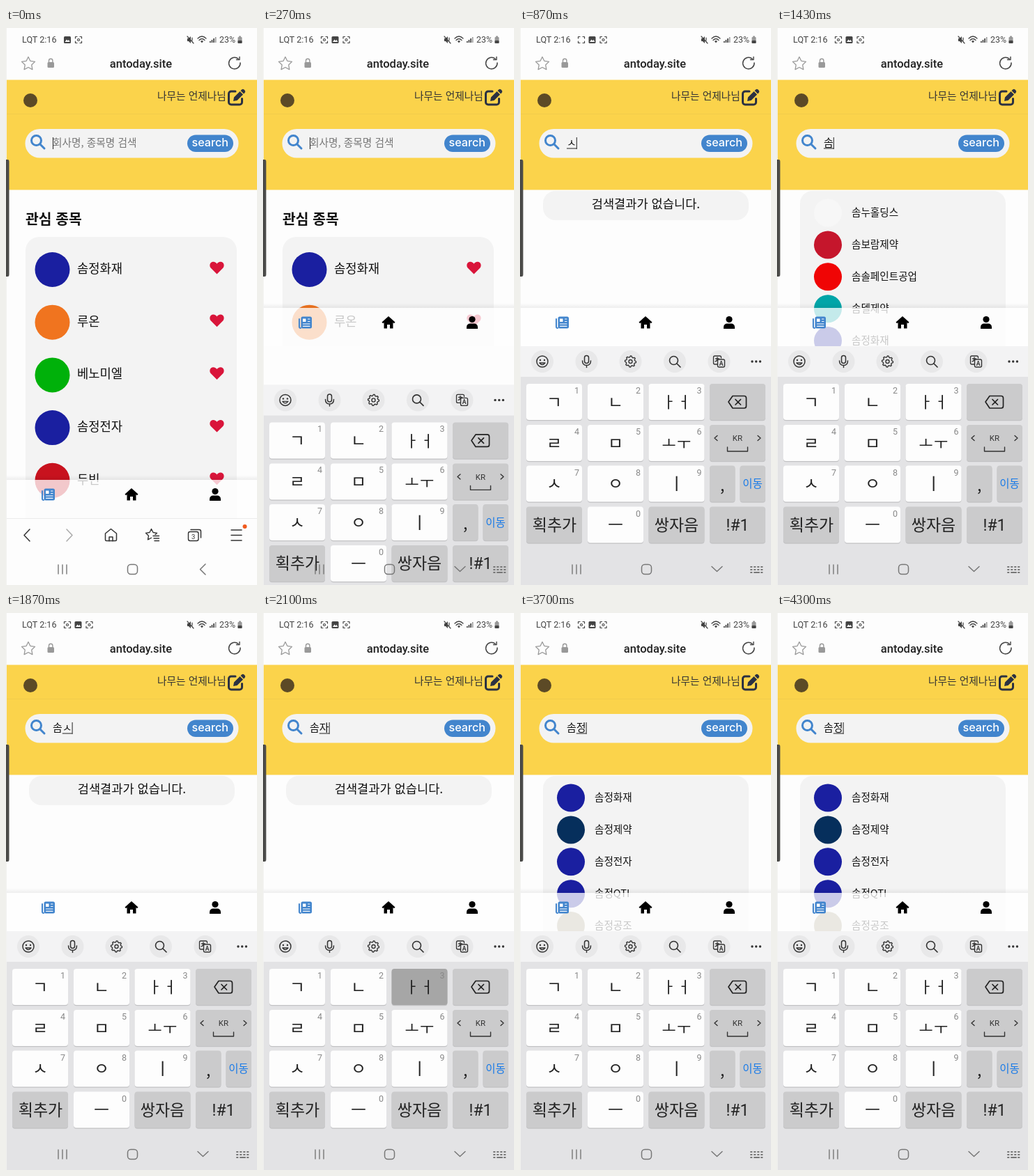
An HTML page that plays this animation: 360 px wide and 800 px high, repeating every 4360 ms.

```html
<!DOCTYPE html>
<html lang="ko">
<head>
<meta charset="utf-8">
<title>Stock search</title>
<style>
html, body { margin: 0; width: 100%; height: 100%; overflow: hidden; background: #fdfdfd; }
svg { display: block; width: 360px; height: 800px; }
text { font-family: "Noto Sans CJK KR", "Noto Sans CJK JP", "Noto Sans CJK", sans-serif; white-space: pre; }
.ui { font-family: Roboto, sans-serif; }
.button { font-family: Inter, sans-serif; font-weight: 500; }
.page { font-weight: 500; }
.line { fill: none; stroke-linecap: round; stroke-linejoin: round; }
</style>
</head>
<body>
<svg id="stage" viewBox="0 0 360 800"></svg>
<script>
const LOOP = 4360, FRAME = 1000 / 30, KB_START = 100, KB_TIME = 366, KB_HEIGHT = 343;
const BLUE = '#4285cd', NAVY = '#1a1fa0', PANEL = '#f3f3f3';

// drawing helpers, all return SVG markup
const rect = (x, y, w, h, fill, r = 0, more = '') =>
  `<rect x="${x}" y="${y}" width="${w}" height="${h}" rx="${r}" fill="${fill}" ${more}/>`;
const dot = (x, y, r, fill, more = '') => `<circle cx="${x}" cy="${y}" r="${r}" fill="${fill}" ${more}/>`;
const ring = (x, y, r, color, w) => dot(x, y, r, 'none', `stroke="${color}" stroke-width="${w}"`);
const line = (d, color, w = 1.5, more = '') =>
  `<path class="line" d="${d}" stroke="${color}" stroke-width="${w}" ${more}/>`;
const shape = (d, fill, more = '') => `<path d="${d}" fill="${fill}" ${more}/>`;
const text = (s, x, y, size, fill = '#111', more = '') =>
  `<text x="${x}" y="${y}" font-size="${size}" fill="${fill}" ${more}>${s}</text>`;
const mid = (s, x, cy, size, fill, more = '') =>
  text(s, x, cy + size * .37, size, fill, 'text-anchor="middle" ' + more);
const at = (x, y, body, more = '') => `<g transform="translate(${x} ${y})" ${more}>${body}</g>`;
const group = (id, body, more = '') => `<g id="${id}" ${more}>${body}</g>`;

const polar = (n, radius) => 'M' + Array.from({ length: n }, (_, i) => {
  const a = i / n * 2 * Math.PI - Math.PI / 2, r = radius(i);
  return (r * Math.cos(a)).toFixed(2) + ' ' + (r * Math.sin(a)).toFixed(2);
}).join('L') + 'Z';
const star = r => polar(10, i => i % 2 ? r * .5 : r);
const gear = polar(32, i => i % 4 < 2 ? 8 : 6.3);

const scan = (x, y, id) => at(x, y,
  line('M-4.5-2V-4.5H-2M2-4.5H4.5V-2M4.5 2V4.5H2M-2 4.5H-4.5V2', '#444', 1.2) +
  group(id, ring(0, 0, 1.5, '#444', 1.2)), `id="${id}Box"`);

function topBar() {
  return rect(0, 0, 360, 74, '#fdfdfd') +
    text('LQT 2:16', 23, 21, 12.6, '#444', 'class="ui"') +
    scan(88, 17, 'scanA') +
    group('picture', rect(-5, -5, 10, 10, '#444', 1.5) + shape('M-3.5 3L-1-.5L.7 1.5L2-.2L3.7 3Z', '#fff')) +
    scan(119.5, 17, 'scanB') +
    shape('M260 15h2l3-3v10l-3-3h-2z', '#444') + line('M260 12l9 10M267 14v4', '#444', 1.2) +
    line('M275 15q6-6 12 0M277 17.5q4-4 8 0', '#444', 1.3) + shape('M279 19q2-2 4 0l-2 2.5z', '#444') +
    [0, 1, 2, 3].map(i => rect(292 + i * 2.6, 19 - i * 2, 1.7, 2 + i * 2, i < 3 ? '#444' : '#999')).join('') +
    text('23%', 306, 21, 12.4, '#444', 'class="ui"') +
    rect(332.5, 13, 6, 9, '#999', 1) + rect(332.5, 18, 6, 4, '#444', 1) + rect(334, 11.5, 3, 2, '#999') +
    at(32, 51.5, line(star(10), '#999', 1.3)) +
    rect(59.5, 49, 9.5, 8, '#999', 1.5) + line('M61.5 49v-2a2.7 2.7 0 0 1 5.4 0v2', '#999', 1.4) +
    mid('antoday.site', 193.5, 51, 16.5, '#222', 'class="ui" font-weight="500"') +
    line('M333 44.2A8.2 8.2 0 1 0 336 50', '#444', 1.5) + line('M330.5 45.5h4.5v-4', '#444', 1.4);
}

function header() {
  return rect(0, 74.5, 360, 158, '#fbd34b') + rect(0, 123, 360, 1, '#f2cb4b') +
    dot(35, 104, 10, '#5c4a26') +
    text('나무는 언제나님', 217, 103, 14.7, '#333') +
    line('M329 91h-6a3.5 3.5 0 0 0-3.5 3.5v12a3.5 3.5 0 0 0 3.5 3.5h12a3.5 3.5 0 0 0 3.5-3.5v-5', '#2b3142', 3) +
    shape('M326 105l1-5.5 8.5-8.5 4.5 4.5-8.5 8.5zM336.5 90l1.5-1.5q1.8-1.5 3.5 0l1 1q1.5 1.8 0 3.5l-1.5 1.5z', '#2b3142') +
    rect(27.5, 145, 306, 41.5, PANEL, 20.75) +
    ring(43.5, 161.5, 7, BLUE, 3) + line('M49 167l6 6', BLUE, 3) +
    rect(260, 153.5, 66, 24.5, BLUE, 12.25) + mid('search', 292.8, 164.5, 16.2, '#fff', 'class="button"') +
    text('회사명, 종목명 검색', 67, 170, 14.7, '#777', 'id="hint"') +
    text('', 67, 170, 15, '#111', 'id="typed" class="page"') +
    rect(0, 172.5, 14, 1, '#222', 0, 'id="under"') + rect(67, 157, 1, 17, '#222', 0, 'id="caret"');
}

const heart = shape('M0 9L-8.7 .3C-11.5-3-10-8.7-5.3-8.7C-2.7-8.7-1-7.3 0-5.8C1-7.3 2.7-8.7 5.3-8.7C10-8.7 11.5-3 8.7 .3Z', '#d9153a');

function favourites() {
  const rows = [['솜정화재', NAVY], ['루온', '#f0741f'], ['베노미엘', '#00b10a'], ['솜정전자', NAVY], ['두빈', '#c8121e']];
  return text('관심 종목', 28, 282, 20.4, '#111', 'font-weight="900"') + rect(28, 300, 303, 500, PANEL, 20) +
    rows.map(([name, color], i) => at(0, 347 + i * 75.7,
      dot(66.5, 0, 25, color) + text(name, 102, 5, 17.7) + at(302.5, -2.5, heart))).join('');
}

function results(rows, id) {
  return rect(33, 234, 295, 300, PANEL, 18) + rows.map(([name, color], i) => at(0, 265.5 + i * 45.9,
    dot(73, 0, 20, color, `id="${id}${i}"`) + text(name, 107, 4.5, 14.6))).join('');
}

const first = [['솜누홀딩스', '#f7f7f7'], ['솜보람제약', '#c5162c'], ['솜솔페인트공업', '#f00505'], ['솜델제약', '#00a5a8'], ['솜정화재', NAVY]];
const second = [['솜정화재', NAVY], ['솜정제약', '#062f5c'], ['솜정전자', NAVY], ['솜정QTI', NAVY], ['솜정공조', '#a59e84']];

// translucent tab bar of the page; everything under it is blank
const tabs = rect(0, -7, 360, 7, 'url(#shade)') + rect(0, 0, 360, 55, '#fff', 0, 'opacity=".77"') +
  rect(0, 55, 360, 400, '#fdfdfd') +
  at(60.5, 21, rect(-6, -8.5, 15.5, 17, BLUE, 2.5) + line('M-8.5-5V6q0 2 2 2', BLUE, 2) +
    rect(-3.5, -5.5, 4.5, 4.5, '#fff') + line('M4-5h2.5M4-1.5h2.5M-3 2h9.5M-3 5.3h9.5', '#fff', 1.2)) +
  at(180, 21, shape('M0-9L9.5-.5L8 1.2L6.5 0V8.5H2V3H-2V8.5H-6.5V0L-8 1.2L-9.5-.5Z', '#000')) +
  at(300, 21, dot(0, -4.5, 4.6, '#000') + shape('M-8 9V7q0-5.5 5.5-5.5h5q5.5 0 5.5 5.5v2z', '#000'));

const browserBar = rect(0, 704, 360, 96, '#fdfdfd') + rect(0, 704, 360, 1, '#ebebeb') +
  line('M34 720l-8 8.5 8 8.5', '#333') + line('M87 720l8 8.5-8 8.5', '#aaa') +
  line('M142.5 726l8-6.5 8 6.5v9q0 1.5-1.5 1.5h-13q-1.5 0-1.5-1.5zM148 737v-6h5v6', '#333') +
  at(208.5, 728, line(star(8.5), '#333', 1.4)) +
  rect(209, 728, 13, 10, '#fdfdfd') + line('M211 729.5h8.5M212 733h7.5M213 736.5h6.5', '#333', 1.4) +
  line('M265 720.5h12q2.5 0 2.5 2.5v9', '#333') +
  rect(261.5, 723.5, 14.5, 13, 'none', 2.5, 'stroke="#333" stroke-width="1.4"') +
  mid('3', 268.7, 730, 9.5, '#333', 'class="ui"') +
  line('M323 721h15M323 728.5h15M323 736h15', '#333') + dot(342.5, 716, 3, '#f05a1e');

function keyboard() {
  const cols = [9, 97, 184.5, 272], rows = [511, 570, 628.5, 687.5], soft = '#cbcbcc', ink = '#333';
  const key = (c, r, body, fill = '#fdfdfd', x = cols[c], w = 80) =>
    rect(x, rows[r] + 1.3, w, 52, '#c2c2c4', 4) + rect(x, rows[r], w, 52, fill, 4, `id="k${c}${r}"`) + body;
  const glyph = (s, x, r, size = 24, color = '#222') => mid(s, x, rows[r] + 26, size, color);
  const num = (n, c, r) => text(n, cols[c] + 76, rows[r] + 14, 12.5, '#888', 'class="ui" text-anchor="end"');
  const plain = [['ㄱ', 0, 0, 1], ['ㄴ', 1, 0, 2], ['ㅏㅓ', 2, 0, 3], ['ㄹ', 0, 1, 4], ['ㅁ', 1, 1, 5],
    ['ㅗㅜ', 2, 1, 6], ['ㅅ', 0, 2, 7], ['ㅇ', 1, 2, 8], ['ㅣ', 2, 2, 9], ['ㅡ', 1, 3, 0]];
  return rect(0, 457, 360, 44, '#f3f3f4') + rect(0, 501, 360, 360, '#e3e3e5') +
    [32, 95.5, 158.5, 222, 285.5].map(x => dot(x, 479, 16, '#e8e8e9')).join('') +
    at(32, 479, ring(0, 0, 8, ink, 1.5) + dot(-3, -2, 1.2, ink) + dot(3, -2, 1.2, ink) + line('M-4 2q4 5 8 0z', ink, 1.4)) +
    at(95.5, 479, rect(-3, -8.5, 6, 11, 'none', 3, `stroke="${ink}" stroke-width="1.5"`) +
      line('M-6-1q0 6.5 6 6.5t6-6.5M0 5.5v3', ink)) +
    at(158.5, 479, line(gear, ink, 1.4) + ring(0, 0, 2.5, ink, 1.4)) +
    at(222, 479, ring(-1.5, -1.5, 6, ink, 1.6) + line('M3 3l5 5', ink, 1.7)) +
    at(285.5, 479, line('M-2 4h-4q-2 0-2-2v-8q0-2 2-2h7q2 0 2 2v1M-5-4h5M-2.5-6v2q0 3-3 4', ink, 1.3) +
      rect(-2, -3, 10, 11, '#e8e8e9', 2, `stroke="${ink}" stroke-width="1.4"`) +
      mid('A', 3, 2.5, 8.5, ink, 'class="ui" font-weight="700"')) +
    [333, 338.7, 344.4].map(x => dot(x, 479, 1.7, ink)).join('') +
    plain.map(([s, c, r, n]) => key(c, r, num(n, c, r) + (s.length < 2 ? glyph(s, cols[c] + 40, r) :
      glyph(s[0], 213.5, r, 22) + glyph(s[1], 235, r, 22)))).join('') +
    key(3, 0, line('M305 528.5h16.5q3 0 3 3v11.5q0 3-3 3H305l-6-9zM309 533.5l7.5 7.5M316.5 533.5l-7.5 7.5', '#222', 1.7), soft) +
    key(3, 1, mid('KR', 312, 589, 11.5, '#333', 'class="ui"') +
      line('M297.5 602v6h29v-6M283 585.5l-4 3.5 4 3.5M341 585.5l4 3.5-4 3.5', '#333', 1.4), soft) +
    key(3, 2, text(',', 287, 665, 23, '#222'), soft, 272, 36.5) +
    key(4, 2, glyph('이동', 333.5, 2, 15.5, '#1a7be8'), soft, 315.5, 36.5) +
    key(0, 3, glyph('획추가', 49.5, 3, 23), soft) + key(2, 3, glyph('쌍자음', 224.5, 3, 23), soft) +
    key(3, 3, mid('!#1', 312, 713.5, 23, '#222', 'class="ui"'), soft);
}

const GREY = '#777';
const system = line('M75 771v13M81 771v13M87 771v13', GREY, 1.4) +
  rect(174.5, 770.5, 14, 14, 'none', 4.5, `stroke="${GREY}" stroke-width="1.5"`) +
  group('back', line('M286 770l-7.5 7.5 7.5 7.5', GREY)) +
  group('hide', line('M275 773.5l7.5 7 7.5-7', GREY) +
    line('M331 774h17M331 778h17M331 782h2M346 782h2', GREY, 2, 'stroke-dasharray="1.5 3.5" stroke-linecap="butt"') +
    line('M336 782h7', GREY, 2));

const stage = document.getElementById('stage');
stage.innerHTML = `<defs><linearGradient id="shade" x2="0" y2="1">
  <stop stop-color="#000" stop-opacity="0"/><stop offset="1" stop-color="#000" stop-opacity=".06"/></linearGradient></defs>` +
  rect(0, 0, 360, 800, '#fdfdfd') + group('favourites', favourites(), 'class="page"') +
  group('none', rect(33, 234, 295, 42, PANEL, 18) + mid('검색결과가 없습니다.', 180.5, 252.5, 17.6, '#111'), 'class="page"') +
  group('first', results(first, 'a'), 'class="page"') + group('second', results(second, 'b'), 'class="page"') +
  topBar() + header() + group('tabs', tabs) + group('browserBar', browserBar) +
  group('keyboard', keyboard()) + system +
  rect(0, 0, 1, 800, '#f1f1ef') + shape('M0 189h2.5q2 0 2 3v162q0 3-2 3h-2.5z', '#4a4a48');

const el = id => document.getElementById(id);
const show = (id, on) => el(id).style.display = on ? '' : 'none';
const move = (id, x, y) => el(id).setAttribute('transform', `translate(${x} ${y})`);

// time, pressed key, text after the press
const strokes = [
  [590, 'k02', 'ㅅ'], [990, 'k21', '소'], [1240, 'k11', '솜'], [1680, 'k02', '솜ㅅ'], [1880, 'k03', '솜ㅈ'],
  [2060, 'k20', '솜자'], [2230, 'k20', '솜저'], [2440, 'k12', '솜정']
];
// time, visible list
const views = [[0, 'favourites'], [640, 'none'], [1390, 'first'], [1780, 'none'], [2600, 'second']];
const PRESS = 90, ADVANCE = 13.8;
const last = (list, t) => list.filter(s => s[0] <= t).pop();
const keyFill = Object.fromEntries(strokes.map(([, k]) => [k, el(k).getAttribute('fill')]));

function draw(t) {
  const open = t >= KB_START, step = Math.floor(t / FRAME) * FRAME;
  const p = Math.min(1, Math.max(0, (step - KB_START) / KB_TIME));
  move('keyboard', 0, KB_HEIGHT * (1 - p) ** 3);
  move('tabs', 0, open ? 402 : 649);
  show('keyboard', open);
  show('hide', open);
  show('back', !open);
  show('browserBar', !open);

  const extra = t >= 200;
  show('scanABox', extra);
  show('scanA', t < 800 || t > 1000);
  move('picture', extra ? 103.5 : 88, 17);
  move('scanBBox', extra ? 119.5 : 104, 17);

  const stroke = last(strokes, t), typed = stroke ? stroke[2] : '';
  const end = 67 + ADVANCE * typed.length;
  el('typed').textContent = typed;
  el('caret').setAttribute('x', end);
  el('under').setAttribute('x', end - ADVANCE);
  show('under', typed);
  show('hint', !typed);
  for (const k in keyFill)
    el(k).setAttribute('fill', stroke && stroke[1] === k && t < stroke[0] + PRESS ? '#a6a6a6' : keyFill[k]);

  const view = last(views, t)[1];
  for (const id of ['favourites', 'none', 'first', 'second']) show(id, id === view);
  show('b3', t >= 3600);
  show('b4', t >= 3700);
}

const start = performance.now();
function tick() {
  draw((performance.now() - start) % LOOP);
  requestAnimationFrame(tick);
}
tick();
</script>
</body>
</html>
```
